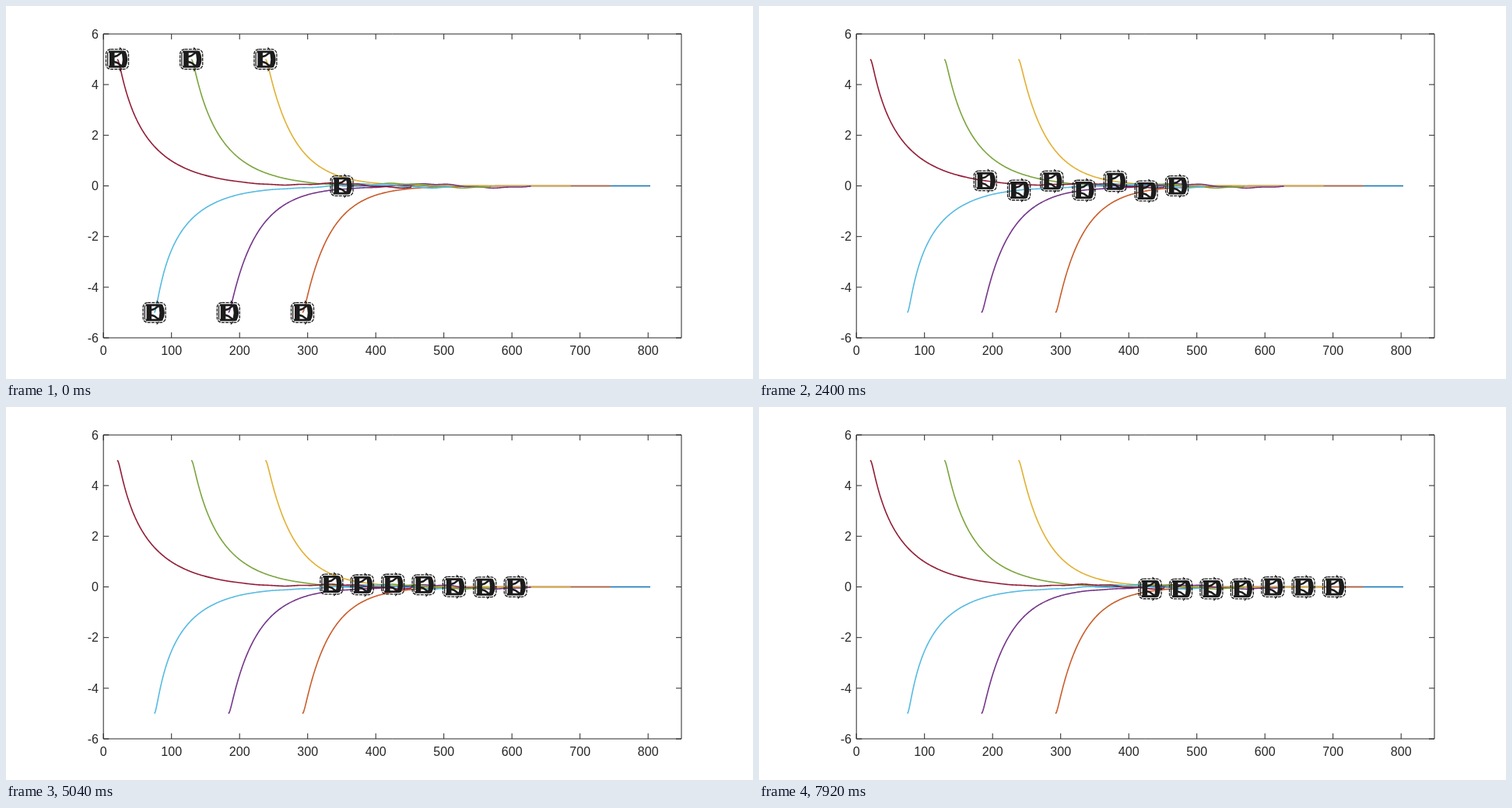
Animation, 960 px wide and 480 px high, one loop 8 s. Source, as an HTML page with a canvas:

```html
<!DOCTYPE html>
<html>
<head>
<meta charset="utf-8">
<style>
html, body { margin: 0; height: 100%; overflow: hidden; background: #fff; }
canvas { display: block; }
</style>
</head>
<body>
<canvas id="stage" width="960" height="480"></canvas>
<script>
const ctx = document.getElementById('stage').getContext('2d');
const INK = '#262626', MID = 231.5, UNIT_X = 0.875, UNIT_Y = 32.6;
const BOX = { l: 125.2, r: 868, t: 36, b: 427 };
const LEAD_START = 431.5, GAP = 39.4;

// side: -1 starts above the lane, 1 below; reach + stretch: decay length near the start and its later growth
const cars = [
  { color: '#0a72b5', side: 0, reach: 1, stretch: 0 },
  { color: '#c95e2c', side: 1, reach: 33, stretch: 3 },
  { color: '#e2b135', side: -1, reach: 34, stretch: 3 },
  { color: '#75368a', side: 1, reach: 33.5, stretch: 5 },
  { color: '#7ba53e', side: -1, reach: 31.5, stretch: 12 },
  { color: '#57bbe2', side: 1, reach: 24, stretch: 19 },
  { color: '#921d37', side: -1, reach: 29.5, stretch: 18 }
];
cars.forEach((c, i) => {
  c.rank = i;
  c.start = i ? 381 - 47.6 * (i - 1) : LEAD_START;
  c.end = 828 - 51.2 * i;
});

// Time and place of the lead car where its speed changes
const leadKeys = [[0, LEAD_START], [880, 461], [4320, 633], [5760, 676.5], [7120, 712], [8000, 741.7]];

function leadX(t) {
  const k = leadKeys.findIndex(key => t < key[0]);
  const [t0, x0] = leadKeys[k - 1], [t1, x1] = leadKeys[k];
  return x0 + (x1 - x0) * (t - t0) / (t1 - t0);
}

// Followers close up from their first distance to an even gap
function carX(c, t) {
  const gap = GAP * c.rank, extra = LEAD_START - c.start - gap;
  return leadX(t) - gap - extra * Math.exp(-((t / (900 + 160 * c.rank)) ** 2));
}

// The rear cars share one fading sway, each a gap later
function sway(c, x) {
  if (c.rank < 3) return 0;
  const u = x + GAP * c.rank;
  const wave = 3 * Math.sin((u - 605) / 31.8) + 0.6 * Math.sin(u / 6);
  return -wave * Math.exp(-(((u - 695) / 110) ** 2));
}

function pathY(c, x) {
  const d = Math.max(0, x - c.start);
  const eased = d - 1.8 * (1 - Math.exp(-d / 1.8));
  const decay = c.reach + c.stretch * (1 - Math.exp(-d / 60));
  return MID + c.side * 5 * UNIT_Y * Math.exp(-eased / decay) + sway(c, x);
}

function line(...p) {
  ctx.beginPath();
  for (let i = 0; i < p.length; i += 2) ctx.lineTo(p[i], p[i + 1]);
  ctx.stroke();
}

function drawAxes() {
  const { l, r, t, b } = BOX;
  ctx.strokeStyle = ctx.fillStyle = INK;
  ctx.lineWidth = 1;
  ctx.font = '16px "Liberation Sans", Arial, sans-serif';
  ctx.strokeRect(l, t, r - l, b - t);
  ctx.textAlign = 'center';
  for (let v = 0; v <= 800; v += 100) {
    const x = 125.2 + v * UNIT_X;
    line(x, b, x, b - 7);
    line(x, t, x, t + 7);
    ctx.fillText(v, x, 449);
  }
  ctx.textAlign = 'right';
  for (let v = -6; v <= 6; v += 2) {
    const y = MID - v * UNIT_Y;
    line(l, y, l + 7, y);
    line(r, y, r - 7, y);
    ctx.fillText(v, 119, y + 5.7);
  }
}

function drawPath(c) {
  ctx.strokeStyle = c.color;
  ctx.lineWidth = 1.6;
  ctx.lineJoin = 'round';
  ctx.beginPath();
  for (let x = c.start; x < c.end; x++) ctx.lineTo(x, pathY(c, x));
  ctx.lineTo(c.end, MID);
  ctx.stroke();
}

function drawCar(x, y) {
  ctx.save();
  ctx.translate(x, y);
  ctx.strokeStyle = ctx.fillStyle = '#1c1c1c';
  ctx.lineWidth = 1.3;
  ctx.setLineDash([4, 1.2]);
  ctx.beginPath();
  ctx.roundRect(-14.5, -12.8, 29, 25.6, 6);
  ctx.stroke();
  ctx.setLineDash([]);
  line(-12.3, -9, -12.3, 9);
  ctx.fillRect(-10, -9, 6.5, 18);
  for (const s of [-1, 1]) {
    ctx.lineWidth = 2.8;
    line(-11, 9.6 * s, 9, 9.6 * s);
    ctx.lineWidth = 2.4;
    line(-5, 3 * s, 0, 4.5 * s, 6, 9 * s);
    ctx.lineWidth = 1.2;
    line(3, 15 * s, 6, 12 * s);
  }
  ctx.beginPath();
  ctx.moveTo(3, -10.5);
  ctx.lineTo(10.5, -10.5);
  ctx.quadraticCurveTo(16, 0, 10.5, 10.5);
  ctx.lineTo(3, 10.5);
  ctx.lineTo(6, 6.5);
  ctx.quadraticCurveTo(7.5, 0, 6, -6.5);
  ctx.fill();
  ctx.restore();
}

function draw(now) {
  const t = Math.floor(now % 8000 / 80) * 80;
  ctx.fillStyle = '#fff';
  ctx.fillRect(0, 0, 960, 480);
  drawAxes();
  cars.forEach(drawPath);
  for (const c of cars) {
    const x = carX(c, t);
    drawCar(x, pathY(c, x));
  }
  requestAnimationFrame(draw);
}
draw(0);
</script>
</body>
</html>
```
